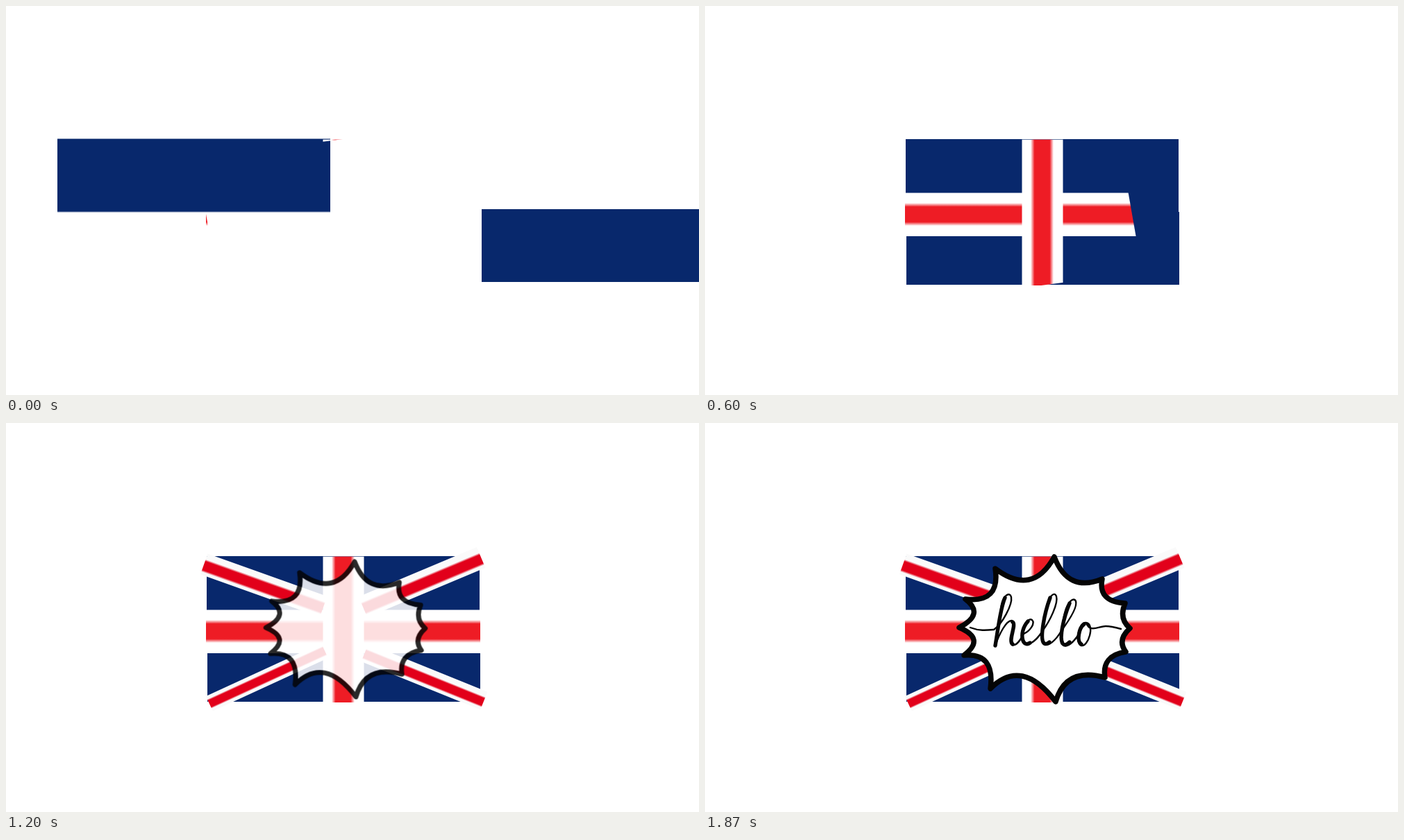
Animation, 998 px wide and 561 px high, one loop 2.23 s. Source, as an HTML page:

```html
<!DOCTYPE html>
<html lang="en">
<head>
<meta charset="utf-8">
<title>Hello</title>
<style>
  html, body { margin: 0; width: 100%; height: 100%; overflow: hidden; background: #fff; }
  svg { display: block; width: 100vw; height: 100vh; }

  .anim { animation: 2230ms linear infinite; }
  .top { animation-name: top; }
  .bottom { animation-name: bottom; }
  .down { animation-name: down; }
  .across { animation-name: across; }
  .rays { animation-name: rays; }
  .burst { animation-name: burst; transform-origin: 489px 297px; }
  .write { animation-name: write; }

  @keyframes top {
    0% { transform: translate(-215px, -.5px); }
    13.45%, 100% { transform: none; }
  }
  @keyframes bottom {
    0% { transform: translate(395px, -4px); }
    13.45%, 100% { transform: none; }
  }
  @keyframes down {
    0%, 14.26% { transform: translateY(0); }
    27.26%, 100% { transform: translateY(216px); }
  }
  @keyframes across {
    0%, 15.47% { transform: translateX(0); }
    29.55%, 100% { transform: translateX(401px); }
  }
  @keyframes rays {
    0%, 36.55% { opacity: 0; }
    46.19%, 100% { opacity: 1; }
  }
  @keyframes burst {
    0%, 47.98% { opacity: 0; transform: scale(0); }
    53.81% { opacity: .85; transform: scale(.93); }
    55%, 59.64% { opacity: 1; transform: scale(1); }
    66.01% { opacity: .05; transform: scale(1.045); }
    72.42%, 100% { opacity: 1; transform: scale(1); }
  }
  @keyframes write {
    0%, 72.42% { transform: translateX(0); }
    83.41%, 100% { transform: translateX(232px); }
  }
</style>
</head>
<body>
<svg viewBox="0 0 998 561" preserveAspectRatio="none">
  <defs>
    <linearGradient id="redV">
      <stop offset="0" stop-color="#ee1c25" stop-opacity="0"/>
      <stop offset=".17" stop-color="#ee1c25"/>
      <stop offset=".83" stop-color="#ee1c25"/>
      <stop offset="1" stop-color="#ee1c25" stop-opacity="0"/>
    </linearGradient>
    <linearGradient id="redH" href="#redV" x2="0" y2="1"/>
    <linearGradient id="redRay" x2="0" y2="1">
      <stop offset="0" stop-color="#e2001a" stop-opacity="0"/>
      <stop offset=".16" stop-color="#e2001a"/>
      <stop offset=".84" stop-color="#e2001a"/>
      <stop offset="1" stop-color="#e2001a" stop-opacity="0"/>
    </linearGradient>
    <clipPath id="clipDown">
      <polygon class="anim down" points="440,-100 530,-100 530,186 440,198"/>
    </clipPath>
    <clipPath id="clipAcross">
      <polygon class="anim across" points="-200,260 281,260 295,340 -200,340"/>
    </clipPath>
    <clipPath id="clipWrite">
      <rect class="anim write" x="140" y="230" width="234" height="110"/>
    </clipPath>
  </defs>

  <g fill="#08286c">
    <rect class="anim top" x="289" y="192" width="393" height="105.5"/>
    <rect class="anim bottom" x="290" y="297" width="393" height="105"/>
  </g>

  <g clip-path="url(#clipAcross)">
    <rect x="288" y="269.5" width="395" height="62.5" fill="#fff"/>
    <rect x="288" y="284" width="395" height="33" fill="url(#redH)"/>
  </g>
  <g clip-path="url(#clipDown)">
    <rect x="456.5" y="192.6" width="59" height="210.4" fill="#fff"/>
    <rect x="469" y="192.6" width="33" height="210.4" fill="url(#redV)"/>
  </g>

  <g id="rays" class="anim rays"></g>

  <g class="anim burst">
    <path id="star" fill="#fff" stroke="#050505" stroke-width="7.5" stroke-linejoin="round"/>
  </g>

  <g clip-path="url(#clipWrite)" fill="none" stroke="#050505" stroke-linecap="round" stroke-linejoin="round" role="img" aria-label="hello">
    <path stroke-width="2.4" d="M382 295C395 300 405 299 416 298C428 290 443 262 441 251C439 243 430 248 427 262
      C424 280 421 303 418 321C424 304 434 284 442 285C450 288 436 314 443 320C450 322 456 309 459 304
      C468 300 476 289 471 284C464 279 455 299 457 312C460 327 476 316 486 300
      C497 285 509 260 506 250C503 242 495 250 491 268C487 288 483 308 487 317C493 326 506 312 513 300
      C524 285 537 266 534 257C531 250 522 258 518 274C514 292 510 312 515 319C522 326 532 314 538 305
      M549 288C538 286 532 318 542 321C552 323 562 290 549 288C554 303 567 293 577 293C585 293 592 295 599 297"/>
    <path stroke-width="5.4" d="M432 252C425 268 422 298 418 321M443 287C449 291 436 314 443 319
      M465 286C458 294 455 305 458 314C460 319 464 320 468 317
      M497 252C488 276 483 308 487 316C489 320 493 319 496 316
      M525 260C516 282 510 310 515 318C518 322 522 319 525 316
      M546 290C538 296 535 315 542 319"/>
  </g>
</svg>
<script>
  // Each ray: start point, end point, red half width, white above and below the axis
  const rays = [
    [284.5, 205.5, 456.5, 267, 8, 18, 13.6],
    [515, 267.5, 685, 196, 8, 18.4, 13.8],
    [293, 405, 459, 328.5, 6, 12, 11.5],
    [516, 333, 687.5, 402.5, 6.5, 15.8, 12]
  ];
  const bar = (y, h, len, fill) =>
    `<rect y="${y}" width="${len}" height="${h}" fill="${fill}"/>`;

  document.getElementById('rays').innerHTML = rays.map(([x, y, x2, y2, half, up, low]) => {
    const len = Math.hypot(x2 - x, y2 - y);
    const turn = Math.atan2(y2 - y, x2 - x) * 180 / Math.PI;
    return `<g transform="translate(${x} ${y}) rotate(${turn})">` +
      bar(-up, up + low, len, '#fafafa') +
      bar(-half - 1.5, 2 * half + 3, len, 'url(#redRay)') + '</g>';
  }).join('');

  // Each entry: a tip and the middle of the arc that follows it
  const spikes = [
    [503, 193, 530, 227], [572, 225, 577, 250], [605, 260, 602, 280],
    [612, 296, 601, 313], [606, 330, 581, 342], [576, 367, 530, 368],
    [505, 402, 457, 365], [411, 383, 405, 345], [373, 335, 387, 313],
    [366, 295, 387, 275], [375, 254, 411, 246], [418, 210, 466, 226]
  ];
  const arcs = spikes.map(([x, y, mx, my], i) => {
    const [nx, ny] = spikes[(i + 1) % spikes.length];
    return `Q${2 * mx - (x + nx) / 2} ${2 * my - (y + ny) / 2} ${nx} ${ny}`;
  });
  document.getElementById('star').setAttribute('d', `M${spikes[0][0]} ${spikes[0][1]}${arcs.join('')}Z`);
</script>
</body>
</html>
```
